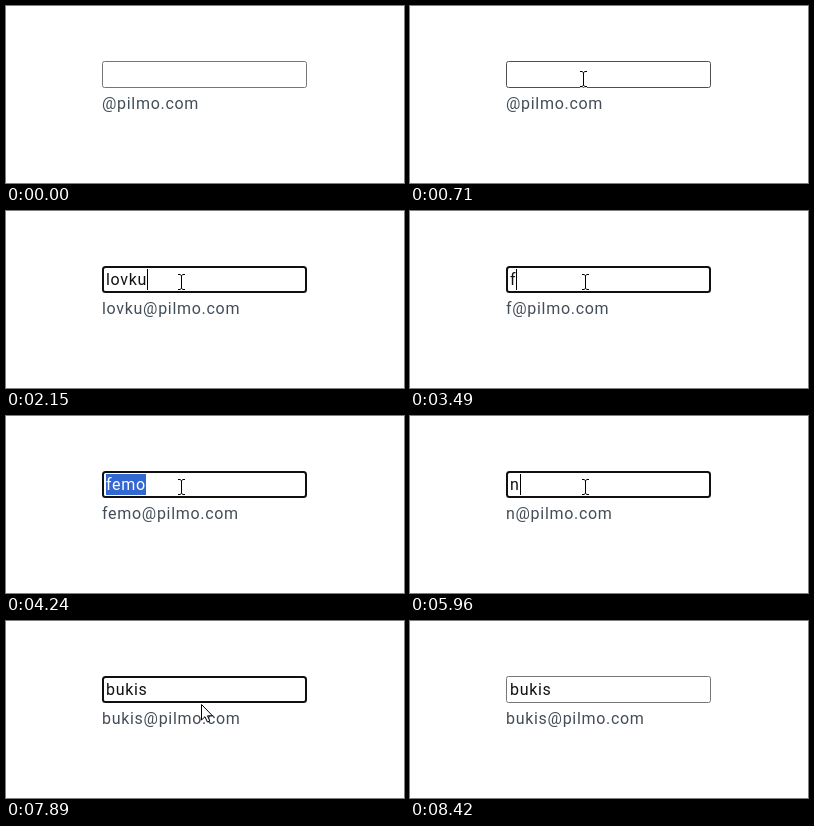
Write an HTML page with a canvas that moves like this. It is 398 by 177 pixels and loops after 8480 ms.

```html
<!DOCTYPE html>
<html lang="en">
<head>
<meta charset="utf-8">
<title>Email field</title>
<style>
  html, body { margin: 0; width: 100%; height: 100%; overflow: hidden; background: #fff; }
  canvas { display: block; }
</style>
</head>
<body>
<canvas id="stage" width="398" height="177"></canvas>
<script>
const ctx = document.getElementById('stage').getContext('2d');
const LOOP = 8480, FOCUS = 910, BLUR = 8420, BLINK = 530;
const DOMAIN = '@pilmo.com';
const TEXT_X = 100;

// [time, value, selected]
const edits = [
  [0, ''],
  [1710, 'l'], [1800, 'lo'], [1900, 'lov'], [2000, 'lovk'], [2150, 'lovku'],
  [2990, 'lovku', true],
  [3490, 'f'], [3560, 'fe'], [3720, 'fem'], [3790, 'femo'],
  [4240, 'femo', true],
  [5310, 'n'], [5510, 'nu'], [5960, 'n'], [6060, ''],
  [6300, 'b'], [6830, 'bu'], [7030, 'buk'], [7140, 'buki'], [7250, 'bukis']
];

const progress = (t, from, to) => Math.min(1, Math.max(0, (t - from) / (to - from)));
const curve = (a, b, c, k) => Math.round((1 - k) ** 2 * a + 2 * k * (1 - k) * b + k * k * c);

function pointerAt(t) {
  if (t < 120 || t >= 8250) return null;
  if (t < 7780) {
    const k = 1 - (1 - progress(t, 120, 940)) ** 3.5;
    return [curve(295, 85, 175, k), curve(180, 148, 71, k)];
  }
  const k = progress(t, 7780, 8250) ** 1.5;
  return [curve(175, 264, 353, k), curve(71, 125, 180, k)];
}

function text(value, x, y, color) {
  ctx.fillStyle = color;
  ctx.fillText(value, x, y);
}

function frame(x, y, w, h, radius, width, color) {
  ctx.beginPath();
  ctx.roundRect(x, y, w, h, radius);
  ctx.lineWidth = width;
  ctx.strokeStyle = color;
  ctx.stroke();
}

function drawBeam(x, y) {
  const path = new Path2D('M-3 -7.5H-1L.5 -6.5L2 -7.5H4M.5 -6.5V6.5M-3 7.5H-1L.5 6.5L2 7.5H4');
  ctx.save();
  ctx.translate(x, y);
  ctx.lineWidth = 2.5;
  ctx.strokeStyle = '#fff';
  ctx.stroke(path);
  ctx.lineWidth = 1;
  ctx.strokeStyle = '#000';
  ctx.stroke(path);
  ctx.restore();
}

function drawArrow(x, y) {
  const path = new Path2D('M.5 .5V16L4 12.7L6.4 18L8.8 17L6.5 11.8H11.5Z');
  ctx.save();
  ctx.translate(x, y);
  ctx.lineWidth = 1;
  ctx.fillStyle = '#fff';
  ctx.fill(path);
  ctx.strokeStyle = '#000';
  ctx.stroke(path);
  ctx.restore();
}

function draw(t) {
  const [changed, value, selected] = edits.findLast(edit => edit[0] <= t);
  const focused = t >= FOCUS && t < BLUR;
  const pointer = pointerAt(t);
  const inside = (x, y, right, bottom) =>
    pointer && pointer[0] >= x && pointer[0] < right && pointer[1] >= y && pointer[1] < bottom;
  const hovered = inside(96, 55, 301, 82);

  ctx.fillStyle = '#fff';
  ctx.fillRect(0, 0, 398, 177);
  ctx.font = '16px Roboto, sans-serif';
  ctx.letterSpacing = '0.7px';

  if (focused) frame(97, 56, 203, 25, 2.5, 2, '#101010');
  else frame(96.5, 55.5, 204, 26, 2, 1, hovered ? '#4f4f4f' : '#767676');

  const width = Math.round(ctx.measureText(value).width);
  if (selected) {
    ctx.fillStyle = '#3367d1';
    ctx.fillRect(TEXT_X, 58, width, 21);
  }
  text(value, TEXT_X, 74, selected ? '#fff' : '#111');

  const idle = t - Math.max(changed, 880);
  if (focused && !selected && idle < BLINK) {
    ctx.fillStyle = '#000';
    ctx.fillRect(TEXT_X + width, 58, 1, 21);
  }

  const label = value + DOMAIN;
  text(label, 96, 103, '#434d58');

  if (pointer) {
    const overLabel = inside(96, 88, 96 + ctx.measureText(label).width, 107);
    (hovered || overLabel ? drawBeam : drawArrow)(...pointer);
  }
}

function tick() {
  draw(performance.now() % LOOP);
  requestAnimationFrame(tick);
}
tick();
</script>
</body>
</html>
```
